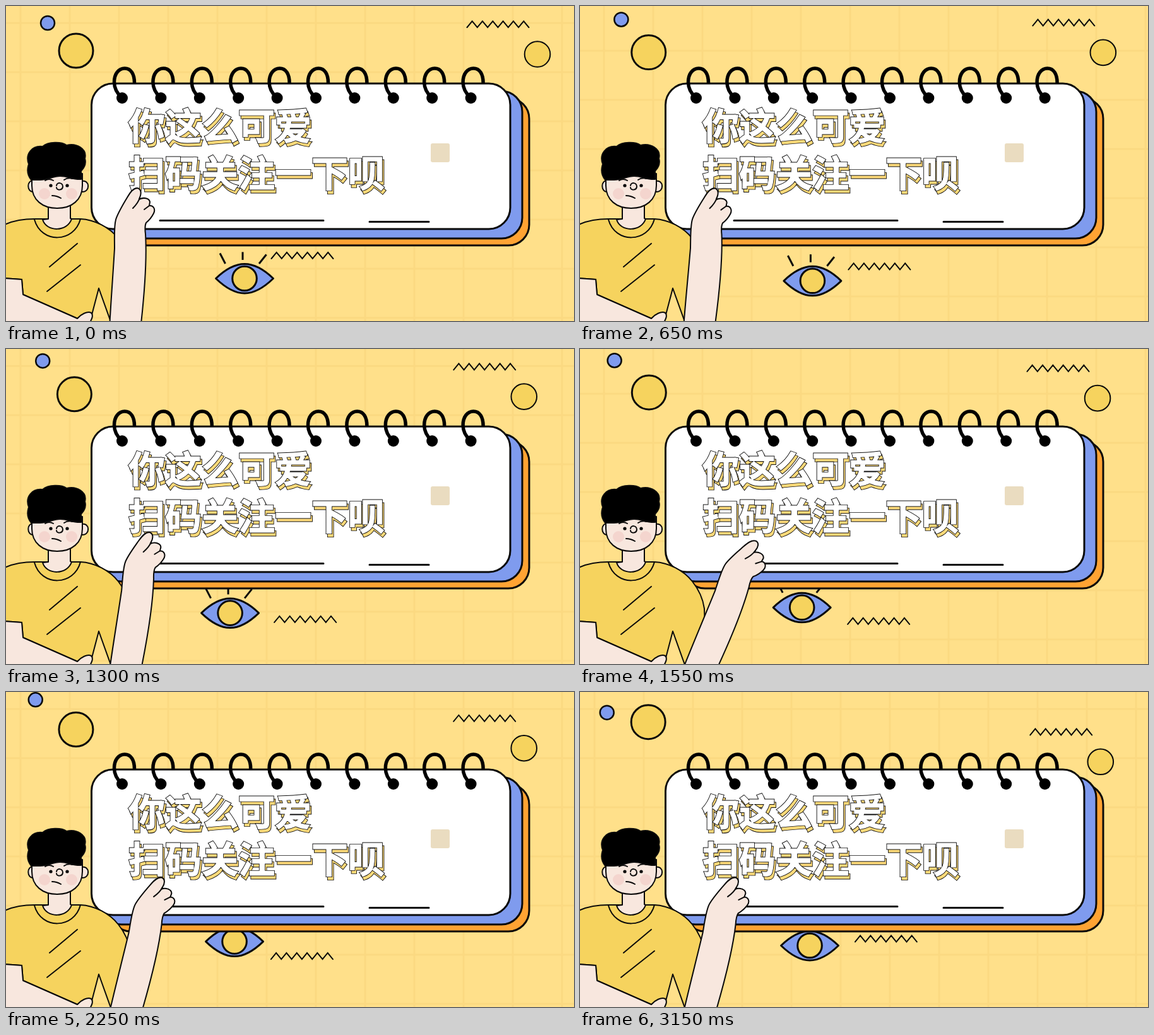
Recreate the animation shown at these times as an HTML page. Size 900 by 500 pixels, loop 3200 ms.

```html
<!DOCTYPE html>
<html lang="zh">
<head>
<meta charset="utf-8">
<title>扫码关注</title>
<style>
html, body { margin: 0; width: 100%; height: 100%; overflow: hidden; background: #ffe08a; }
svg { display: block; width: 900px; height: 500px; }
.ink { stroke: #0a0a0a; stroke-width: 2.5; stroke-linejoin: round; stroke-linecap: round; }
.thick { stroke-width: 3; }
.thin { stroke-width: 2; }
.line { fill: none; }
.skin { fill: #f8e7de; }
.gold { fill: #f6d35e; }
.blue { fill: #7f9bee; }
.title { font: 700 58px "Noto Sans CJK SC", "Noto Sans CJK", "Noto Sans SC", sans-serif; stroke-linejoin: miter; }
.edge { fill: #111; stroke: #111; stroke-width: 3; }
.face { fill: #fff; stroke: #fff; stroke-width: 1.2; }
.shade { fill: #ffdb7a; stroke: #ffdb7a; stroke-width: 1.2; }
</style>
</head>
<body>
<svg viewBox="0 0 900 500">
  <defs>
    <pattern id="grid" width="78" height="78" patternUnits="userSpaceOnUse">
      <path d="M23 0V78M0 27H78" fill="none" stroke="#fbd981" stroke-width="3"/>
    </pattern>
    <path id="zig" class="ink line thin" style="stroke-linejoin:miter"/>
    <g id="words">
      <text x="194" y="212">你这么可爱</text>
      <text x="194" y="287">扫码关注一下呗</text>
    </g>
    <g id="ring">
      <path d="M0 0C-8 -7 -12.500 -16 -12.500 -25C-12.500 -39 -5 -47 4 -47C14 -47 19.500 -38 19.500 -24" fill="none" stroke="#000" stroke-width="5.500"/>
      <circle r="9"/>
    </g>
  </defs>

  <rect width="900" height="500" fill="#ffe08a"/>
  <rect width="900" height="500" fill="url(#grid)"/>

  <circle id="dot" class="ink blue" r="11"/>
  <circle id="ball" class="ink gold thick" r="27"/>
  <g id="right">
    <circle class="ink gold thin" r="20.300"/>
    <use href="#zig" x="-111.500" y="-47.500"/>
  </g>
  <use id="wave" href="#zig"/>
  <g id="eye" class="ink thick">
    <path class="blue" d="M-45.500 0C-30 -15 -15 -23 0 -23S30 -15 45.500 0C30 15 15 23.500 0 23.500S-30 15 -45.500 0Z"/>
    <circle class="gold" r="19.300"/>
    <path class="line" stroke-linecap="butt" d="M-39 -40L-30.500 -23.500M-3 -42V-29.500M34.500 -38L23 -23.500"/>
  </g>

  <g class="ink thick">
    <rect x="165" y="146" width="664" height="234" rx="33" fill="#ffa333"/>
    <rect x="150" y="135" width="668" height="234" rx="33" class="blue"/>
    <rect x="135.500" y="123" width="663.500" height="231" rx="34" fill="#fff"/>
    <path d="M244 340.500H503M576 342.500H670"/>
  </g>
  <g id="rings"></g>
  <g class="title">
    <g transform="translate(2.500 5)"><use href="#words" class="edge"/><use href="#words" class="shade"/></g>
    <use href="#words" class="edge"/><use href="#words" class="face"/>
  </g>
  <rect x="673" y="218" width="30" height="30" rx="3" fill="#eadcc0"/>

  <g class="ink thin">
    <path class="gold" d="M-4 348C8 342 26 338 45 338H118C140 339 164 351 178 369C190 384 195 398 197 412L200 504H167L147 448L136 490L113 496L27 458L25 434L-4 432Z"/>
    <path class="skin" d="M-4 432L25 434L27 458L113 496C119 489 129 484 135 487C139 491 136 497 132 504H-4Z"/>
    <path class="line" d="M113 377L69 414M118 411L65 453"/>
    <path class="skin" d="M67 314V338L58 339C64 359 97 359 104 338L102 337V314Z"/>
    <path class="line" d="M45 339C56 378 108 376 118 338"/>
    <path class="skin" d="M43 278C33 275 32 296 44 295ZM120 278C133 275 134 296 120 295Z"/>
    <path class="skin" d="M41 266V285C41 308 58 321 81 321S121 308 121 285V266Z"/>
    <path fill="#000" d="M40 276C34 269 33 260 36 251C30 235 41 221 58 223C67 215 88 215 96 221C112 217 129 227 125 242C128 252 122 259 119 262V275C106 276 98 270 86 270C74 270 66 276 54 276Z"/>
    <g stroke="none">
      <g fill="#f4d5ce"><circle cx="61" cy="298" r="9"/><circle cx="104" cy="298" r="9"/></g>
      <circle cx="71" cy="285" r="2.600"/><circle cx="97" cy="285" r="2.600"/>
    </g>
    <path class="line" d="M62 277Q68 273 75 277M92 276Q98 272 105 274M80 285C81 279 90 280 90 287C89 293 80 293 80 288M73 301Q80 301 87 305"/>
  </g>

  <g id="arm" class="ink thin">
    <path class="skin" d="M163 530C165 485 169 435 172 385C172 365 171 350 174 339C177 329 185 316 192 304C196 297 201 289 208 289C214 290 215 297 212 304L211 307C218 303 227 305 228 311L227 317C234 316 237 323 234 329C231 335 227 340 222 344C220 348 220 354 221 362C223 395 222 440 211 530Z"/>
    <path class="line" d="M212 304C210 311 206 316 201 321M227 317L219 323"/>
  </g>
</svg>
<script>
const LOOP = 3200, STEP = 50;
const $ = id => document.getElementById(id);
const place = (el, x, y) => el.setAttribute("transform", `translate(${x.toFixed(2)} ${y.toFixed(2)})`);

$("zig").setAttribute("d", "M" + Array.from({ length: 13 }, (_, i) => `${i * 8.16} ${i % 2 ? -5 : 5}`).join("L"));
for (let i = 0; i < 10; i++) {
  const ring = document.createElementNS("http://www.w3.org/2000/svg", "use");
  ring.setAttribute("href", "#ring");
  place(ring, 184 + i * 61.4, 146);
  $("rings").append(ring);
}

// Key points, spread evenly over the loop
const drift = {
  dot: [[66, 27], [64.5, 20.5], [54, 18], [45.5, 13], [42.5, 34]],
  ball: [[111, 71], [108, 73.5], [111, 61], [108, 47]],
  right: [[842, 76.5], [822.5, 74], [820.5, 87], [825, 112]],
  wave: [[420.5, 396], [426, 417], [424, 432], [420.5, 415], [437, 390]],
  eye: [[378, 432.5], [366, 435], [351.5, 409], [364, 395], [364, 403]]
};

// Smooth curve through the key points, u from 0 to 1
function along(keys, u) {
  const last = keys.length - 1, i = Math.min(Math.floor(u * last), last - 1), f = u * last - i;
  return [0, 1].map(axis => {
    const at = k => keys[k][axis];
    const slope = k => {
      const a = Math.max(k - 1, 0), b = Math.min(k + 1, last);
      return (at(b) - at(a)) / (b - a);
    };
    return at(i) + (at(i + 1) - at(i)) * f * f * (3 - 2 * f)
      + f * (1 - f) * (slope(i) * (1 - f) - slope(i + 1) * f);
  });
}

function draw(t) {
  for (const id in drift) place($(id), ...along(drift[id], t / LOOP));
  const swing = 10 * (1 - Math.cos(t / 600 * 2 * Math.PI));
  $("arm").setAttribute("transform", `rotate(${swing.toFixed(3)} 195.5 512)`);
  const shifted = Math.floor(t / 500) % 2;
  $("grid").setAttribute("patternTransform", shifted ? "translate(15 44)" : "translate(0 0)");
}

const start = performance.now();
function tick() {
  draw(Math.floor((performance.now() - start) % LOOP / STEP) * STEP);
  requestAnimationFrame(tick);
}
tick();
</script>
</body>
</html>
```
